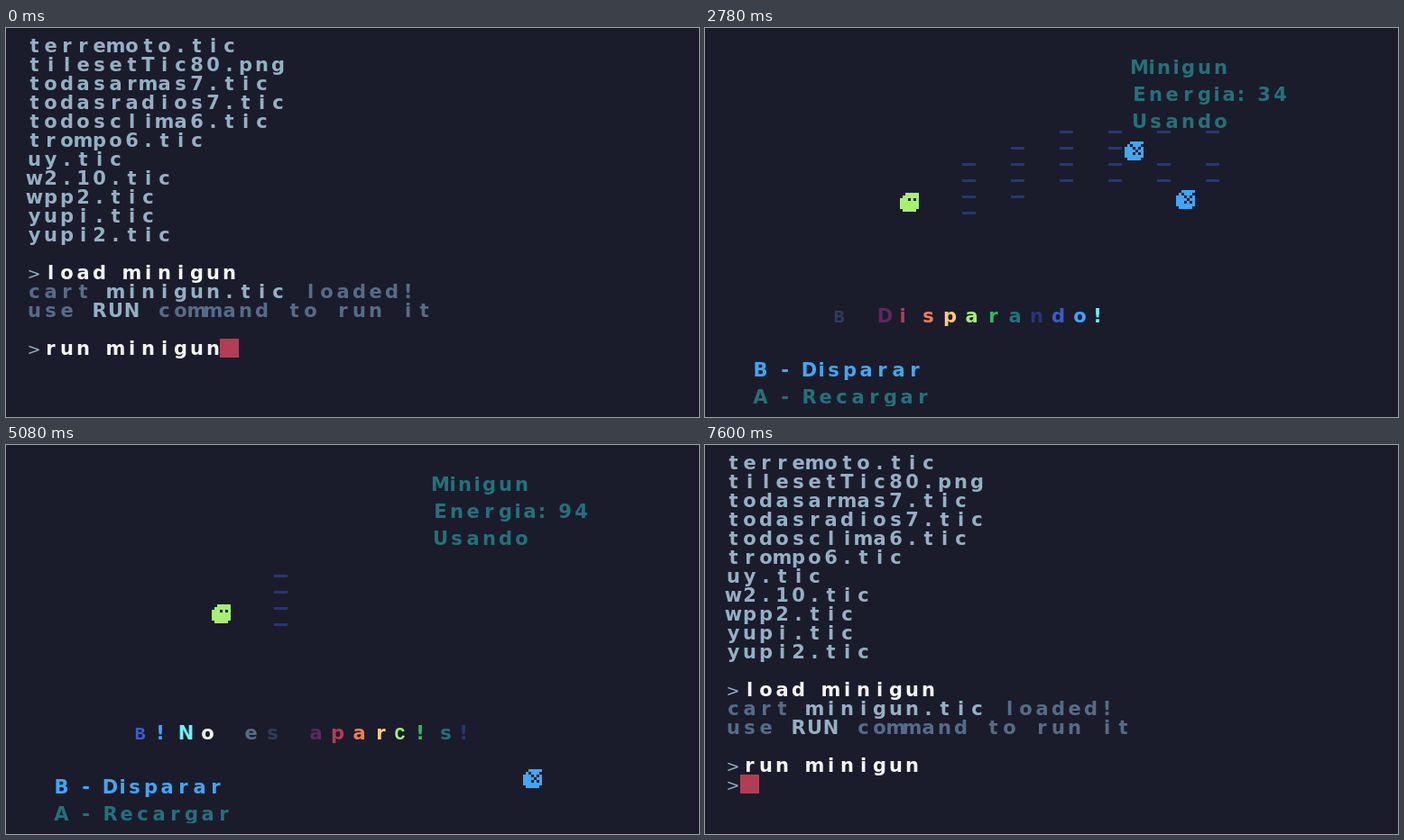
An HTML page with a canvas for the animation above (8100 ms loop, 768 by 432 pixels).

```html
<!DOCTYPE html>
<html lang="es">
<head>
<meta charset="utf-8">
<title>Minigun</title>
<style>
html, body { margin: 0; width: 100%; height: 100%; overflow: hidden; background: #1a1c2c; }
canvas { display: block; }
</style>
</head>
<body>
<canvas id="stage" width="768" height="432"></canvas>
<script>
const ctx = document.getElementById('stage').getContext('2d');
const LOOP = 8100, GAME_START = 400, GAME_END = 7600;
const PX = 3, SPEED = 3 * PX, FIRE_EVERY = 6, BOOM_LIFE = 26, LAST_TICK = 460;

const COLORS = ['#1a1c2c', '#5d275d', '#b13e53', '#ef7d57', '#ffcd75', '#a7f070', '#38b764', '#257179',
  '#29366f', '#3b5dc9', '#41a6f6', '#73eff7', '#f4f4f4', '#94b0c2', '#566c86', '#333c57'];
const BG = 0, RED = 2, GREEN = 5, TEAL = 7, NAVY = 8, BLUE = 10, WHITE = 12, PALE = 13, GREY = 14;

const FILES = ['terremoto.tic', 'tilesetTic80.png', 'todasarmas7.tic', 'todasradios7.tic', 'todosclima6.tic',
  'trompo6.tic', 'uy.tic', 'w2.10.tic', 'wpp2.tic', 'yupi.tic', 'yupi2.tic'];

// All game times are ticks of 1/60 s. "~" marks a narrow glyph.
const BURSTS = [
  { from: 70, to: 95, say: '~B!Disparando!' },
  { from: 126, to: 186, say: '~B!Disparando!' },
  { from: 199, to: 220, say: '~B!R~C!faga!' },
  { from: 299, to: 328, say: '~B!No escapar~C!s!' },
  { from: 340, to: 380, say: '~B!Minigun a full!' },
  { from: 380, to: 420, say: '~B!Toma esto!' }
];
const RELOAD = { from: 274, to: 291 };

// Vertical runs, each followed by a few steps to the right
const RUNS = [
  { at: 96, ticks: 24, dir: -1, right: 0 },
  { at: 150, ticks: 37, dir: 1, right: 1 },
  { at: 200, ticks: 27, dir: -1, right: 3 },
  { at: 300, ticks: 24, dir: 1, right: 2 },
  { at: 325, ticks: 51, dir: 1, right: 0 },
  { at: 381, ticks: 39, dir: -1, right: 0 }
];

const ENEMIES = [
  { x: 465, y: 126, from: 0, to: 173 },
  { x: 522, y: 180, from: 150, to: 192 },
  { x: 573, y: 360, from: 218, to: 410 },
  { x: 492, y: 159, from: 390, to: 999 }
];

const NARROW = { i: 9, ':': 9, '!': 9, ' ': 12, '-': 12, '1': 15, l: 12 };
const BOLD = 'bold 21px "DejaVu Sans", sans-serif';
const THIN = '18px "DejaVu Sans", sans-serif';
const SLIM = 'bold 20px "Liberation Mono", monospace';

const clamp = (v, lo, hi) => Math.min(hi, Math.max(lo, v));
const during = (span, tick) => tick >= span.from && tick < span.to;
const burstAt = tick => BURSTS.find(b => during(b, tick));

// One unit per tick of fire, six back per tick of reload
const energy = [100];
for (let t = 1; t <= LAST_TICK; t++) {
  const change = during(RELOAD, t) ? 6 : burstAt(t) ? -1 : 0;
  energy[t] = clamp(energy[t - 1] + change, 0, 100);
}

function playerAt(tick) {
  let x = 216, y = 207;
  for (const r of RUNS) {
    y += r.dir * PX * clamp(tick - r.at, 0, r.ticks);
    x += PX * clamp(tick - r.at - r.ticks, 0, r.right);
  }
  return [x, y];
}

function rect(x, y, w, h, color) {
  ctx.fillStyle = COLORS[color];
  ctx.fillRect(x, y, w, h);
}

function glyph(ch, center, base, color, font = BOLD) {
  ctx.font = font;
  ctx.textAlign = 'center';
  ctx.fillStyle = COLORS[color];
  ctx.fillText(ch, center, base);
}

// Fixed cells for the console
function cells(str, col, row, color) {
  [...str].forEach((ch, i) => glyph(ch, 24 + (col + i) * 18 + 7.5, 27 + row * 21, color));
}

// Proportional cells for the game
function label(str, x, base, color) {
  for (const ch of str) {
    const w = NARROW[ch] || 18;
    glyph(ch, x + (w - PX) / 2, base, color);
    x += w;
  }
}

function prompt(row, command) {
  glyph('>', 31, 27 + row * 21, PALE, THIN);
  cells(command, 1, row, WHITE);
}

function drawConsole(done) {
  FILES.forEach((name, row) => cells(name, 0, row, PALE));
  prompt(12, 'load minigun');
  cells('cart', 0, 13, GREY);
  cells('minigun.tic', 5, 13, PALE);
  cells('loaded!', 17, 13, GREY);
  cells('use', 0, 14, GREY);
  cells('RUN', 4, 14, PALE);
  cells('command to run it', 8, 14, GREY);
  prompt(16, 'run minigun');
  if (done) prompt(17, '');
  const [col, row] = done ? [1, 17] : [12, 16];
  rect(21 + col * 18, 9 + row * 21, 21, 21, RED);
}

const playerEyes = (c, r) => r === 2 && (c === 3 || c === 5);
const enemyCross = (c, r) => r > 0 && r < 5 && Math.abs(c - 4) === Math.abs(r - 3);

// A 7 x 7 blob with clipped corners
function sprite(x, y, color, dark) {
  for (let r = 0; r < 7; r++) {
    for (let c = 0; c < 7; c++) {
      const corner = c + r < 2 || (r === 6 && c % 6 === 0);
      if (!corner && !dark(c, r)) rect(x + c * PX, y + r * PX, PX, PX, color);
    }
  }
}

function disc(x, y, r) {
  for (let d = -r; d <= r; d++) {
    const half = Math.min(r, Math.round(Math.sqrt(r * r - d * d + r)));
    rect(x - half * PX, y + d * PX, (2 * half + 1) * PX, PX, RED);
  }
}

// A shot ends at the first living enemy on its line
function stopped(x0, y, fired, tick) {
  return ENEMIES.some(e => {
    const hit = fired + (e.x - x0 - 15) / SPEED;
    return y >= e.y && y < e.y + 21 && hit <= tick && during(e, hit);
  });
}

function drawShots(tick) {
  for (let fired = tick - tick % FIRE_EVERY; fired > tick - 60; fired -= FIRE_EVERY) {
    if (!burstAt(fired - 1) || !energy[fired]) continue;
    const [px, py] = playerAt(fired);
    const x0 = px + 33;
    for (let i = 0; i < 4; i++) {
      const y = py - 21 + i * 18;
      if (!stopped(x0, y, fired, tick)) rect(x0 + (tick - fired) * SPEED, y, 15, PX, NAVY);
    }
  }
}

function drawEnemies(tick) {
  for (const e of ENEMIES) {
    const age = tick - e.to;
    if (during(e, tick)) sprite(e.x, e.y, BLUE, enemyCross);
    else if (age >= 0 && age < BOOM_LIFE) disc(e.x + 9, e.y + 9, Math.floor(age * 0.6));
  }
}

// The palette runs along the letters, one colour per tick
function drawMessage(text, tick) {
  const letters = text.match(/~?./g);
  letters.forEach((part, i) => {
    const slim = part.length > 1, ch = part.slice(-1);
    const w = slim ? 12 : NARROW[ch] || 18;
    glyph(ch, 144 + i * 24 + (w - PX) / 2, 327, (tick + 9 + i) % 16, slim ? SLIM : BOLD);
  });
}

function drawGame(tick) {
  const burst = burstAt(tick);
  ctx.save();
  ctx.beginPath();
  ctx.rect(24, 12, 720, 408);
  ctx.clip();
  drawShots(tick);
  drawEnemies(tick);
  sprite(...playerAt(tick), GREEN, playerEyes);
  label('Minigun', 474, 51, TEAL);
  label('Energia: ' + energy[tick], 474, 81, TEAL);
  label('Usando', 474, 111, TEAL);
  label('B - Disparar', 54, 387, burst ? BLUE : TEAL);
  label('A - Recargar', 54, 417, during(RELOAD, tick) ? BLUE : TEAL);
  if (burst) drawMessage(burst.say, tick);
  ctx.restore();
}

function render() {
  const t = Math.floor(performance.now() % LOOP / 20) * 20;
  rect(0, 0, 768, 432, BG);
  if (t < GAME_START || t >= GAME_END) drawConsole(t >= GAME_END);
  else drawGame(Math.floor(t * 3 / 50));
  requestAnimationFrame(render);
}
render();
</script>
</body>
</html>
```
